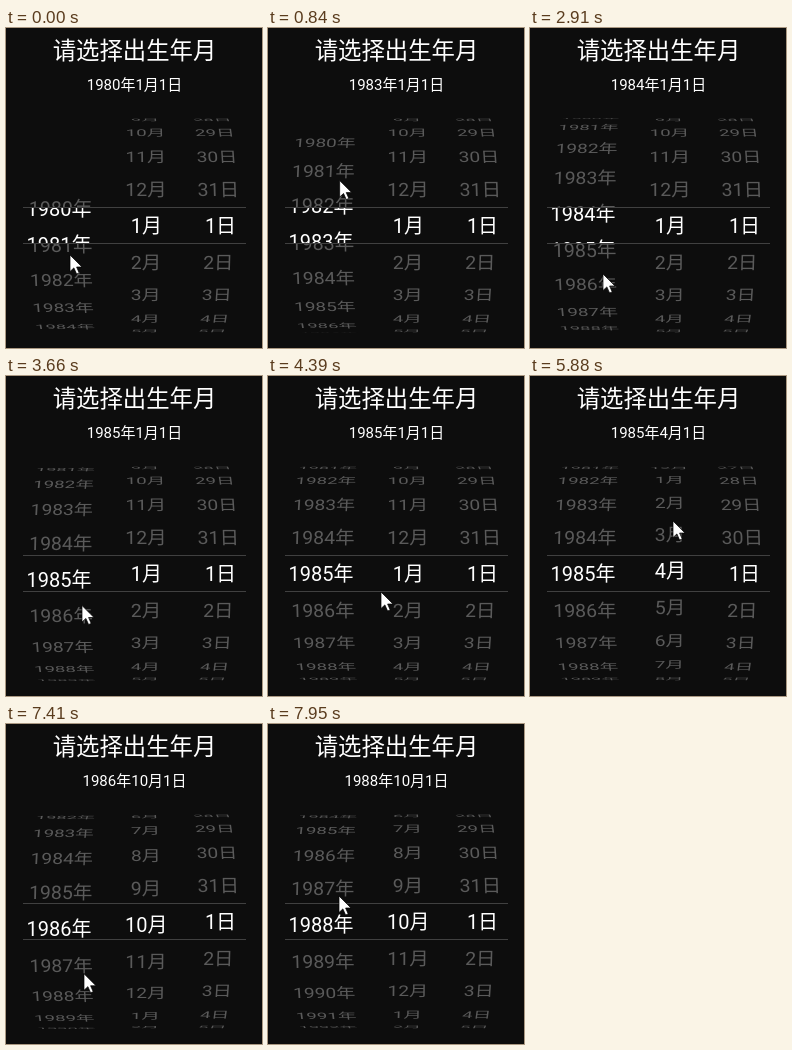
An HTML page for the animation above (8000 ms loop, 256x320 px).

```html
<!DOCTYPE html>
<html lang="zh-CN">
<head>
<meta charset="utf-8">
<title>日期选择</title>
<style>
  html, body { margin: 0; width: 100%; height: 100%; overflow: hidden; background: #0d0d0d; }
  svg { display: block; width: 256px; height: 320px; }
  text { font-family: Roboto, "Noto Sans CJK SC", "Noto Sans CJK", sans-serif; text-anchor: middle; fill: #fff; }
  .wheel text { font-size: 20px; fill: #5a5a5a; }
  .strip text { font-size: 20px; }
</style>
</head>
<body>
<svg viewBox="0 0 256 320">
  <defs><clipPath id="band"><rect x="17" y="180" width="223" height="35"/></clipPath></defs>
  <rect width="256" height="320" fill="#0d0d0d"/>
  <text x="128.5" y="30.5" font-size="23.4">请选择出生年月</text>
  <text id="date" x="128.5" y="61.5" font-size="15"></text>
  <g id="wheel" class="wheel"></g>
  <rect x="17" y="179" width="223" height="37" fill="#0d0d0d"/>
  <path d="M17 179.5H240M17 215.5H240" stroke="#404040"/>
  <g clip-path="url(#band)"><g id="strip" class="strip"></g></g>
  <path id="cursor" d="M0 0V16.5L3.9 12.9 6.6 19 9.2 17.9 6.6 12H12Z" fill="#fff" stroke="#000" stroke-width=".7"/>
</svg>
<script>
const LOOP = 8000, MID_X = 128, MID_Y = 197.5, BASE = 7.5;
const ROW = 36, STEP = Math.PI / 9, RADIUS = 107, DEPTH = 1000, BACK = 20;
const $ = id => document.getElementById(id);

// Runs of picture updates: first time, last time, count
const RUNS = [[120, 1140, 8], [1290, 2190, 8], [2340, 3270, 8], [3390, 4110, 6],
  [4390, 5050, 6], [5580, 6570, 8], [6720, 7680, 8], [7830, 7950, 2]];
const ticks = [0];
for (const [a, b, n] of RUNS)
  for (let i = 0; i < n; i++) ticks.push(a + (b - a) * i / (n - 1));

// Time, then one or more values, joined by straight lines
const YEAR = [[0, 1980.48], [1220, 1983.45], [1500, 1984], [2740, 1984], [2871, 1984.33],
  [3250, 1984.62], [3900, 1984.95], [4250, 1985], [7200, 1985], [7950, 1987.92]];
const MOUSE = [[0, 64, 227], [1220, 75, 120], [1500, 77, 90], [1800, 77, 110], [2700, 74, 258],
  [2871, 73, 246], [3250, 73, 236], [4110, 79, 223], [4390, 113, 216], [5050, 154, 256],
  [5450, 154, 256], [5863, 143, 145], [6050, 140, 108], [6570, 126, 150], [6857, 96, 232],
  [7130, 82, 282], [7250, 80, 272], [7950, 71, 172]];

function along(keys, t) {
  let i = 0;
  while (i < keys.length - 2 && t > keys[i + 1][0]) i++;
  const a = keys[i], b = keys[i + 1];
  const u = Math.min(1, Math.max(0, (t - a[0]) / (b[0] - a[0])));
  return a.slice(1).map((v, j) => v + (b[j + 1] - v) * u);
}

// Drag, then a flick that slows down to October
function monthAt(t) {
  if (t < 5863) return 1 + 3.08 * Math.max(0, (t - 5450) / 413);
  return 10 - Math.max(0, 6.12 * Math.exp((5863 - t) / 508) - 0.2);
}

const wrap = (n, size) => ((n - 1) % size + size) % size + 1;

function addTexts(parent, count) {
  return Array.from({ length: count }, () =>
    parent.appendChild(document.createElementNS("http://www.w3.org/2000/svg", "text")));
}

class Column {
  constructor(x, label) {
    this.x = x;
    this.label = label;
    this.far = addTexts($("wheel"), 11);
    this.near = addTexts($("strip"), 3);
  }
  draw(pos, ...args) {
    const first = Math.round(pos);
    this.far.forEach((el, i) => {
      const n = first + i - 5, angle = (n - pos) * STEP;
      const sin = Math.sin(angle), cos = Math.cos(angle);
      el.textContent = cos > 0.01 ? this.label(n, ...args) : "";
      const s = DEPTH / (DEPTH + BACK + 100 * (1 - cos));
      const dx = this.x - MID_X;
      const skew = -dx * sin * s * s / DEPTH;
      el.setAttribute("y", BASE);
      el.setAttribute("transform",
        `matrix(${s} 0 ${skew} ${s * cos} ${MID_X + dx * s} ${MID_Y + RADIUS * sin})`);
    });
    this.near.forEach((el, i) => {
      const n = first + i - 1;
      el.textContent = this.label(n, ...args);
      el.setAttribute("x", this.x);
      el.setAttribute("y", MID_Y + BASE + (n - pos) * ROW);
    });
  }
}

const years = new Column(53, n => n < 1980 ? "" : n + "年");
const months = new Column(140.3, n => wrap(n, 12) + "月");
const days = new Column(214.5, (n, size) => wrap(n, size) + "日");

function render(t) {
  const [year] = along(YEAR, t), month = monthAt(t), [mx, my] = along(MOUSE, t);
  const y = Math.round(year), m = wrap(Math.round(month), 12);
  $("date").textContent = `${y}年${m}月1日`;
  years.draw(year);
  months.draw(month);
  days.draw(1, new Date(y, m, 0).getDate());
  $("cursor").setAttribute("transform", `translate(${mx} ${my})`);
}

let shown = -1;
function loop() {
  const t = performance.now() % LOOP;
  const tick = ticks.filter(v => v <= t + 20).pop();
  if (tick !== shown) render(shown = tick);
  requestAnimationFrame(loop);
}
loop();
</script>
</body>
</html>
```
